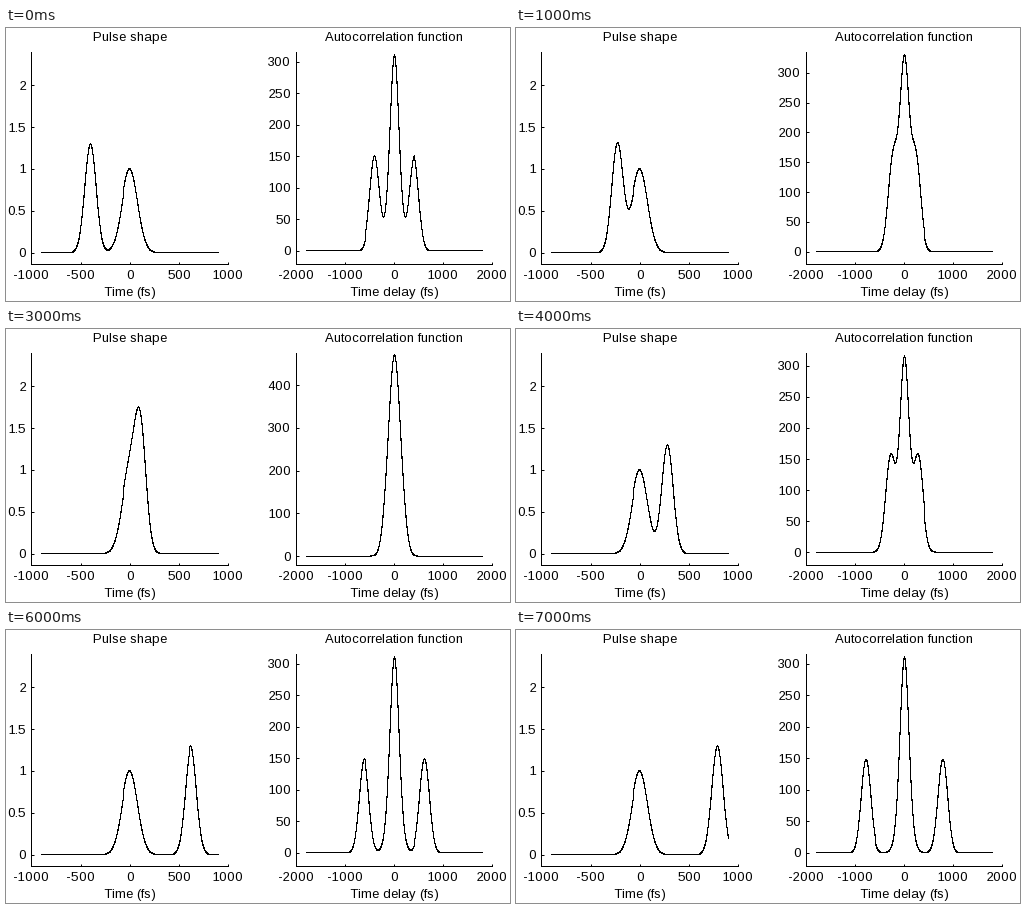
A matplotlib script for the animation above (8000 ms loop, 504 by 273 pixels).

```python
import numpy as np
import matplotlib.pyplot as plt
from matplotlib.animation import FuncAnimation
from matplotlib.transforms import IdentityTransform

W, H, DPI = 504, 273, 84
FRAMES, INTERVAL = 8, 1000
PX = 72 / DPI  # points per pixel

plt.rcParams.update({
    "font.family": "Liberation Sans",
    "font.size": 13 * PX,
    "axes.unicode_minus": False,
    "text.hinting": "force_autohint",
    "text.hinting_factor": 1,
    "path.simplify": False,
})

fig = plt.figure(figsize=(W / DPI, H / DPI), dpi=DPI, facecolor="white")

time = np.arange(-900, 901)
delay = np.arange(-1800, 1801)


def pulse(shift):
    fixed = np.exp(-time**2 / (2 * 80**2))
    moving = 1.3 * np.exp(-((time - shift) / 80) ** 2)
    return fixed + moving


def panel(left, right, title, xlabel, xlim, xticks):
    """Open axes placed by pixel, with a title and an x label."""
    bottom, height = 37.4, 212
    ax = fig.add_axes([left / W, bottom / H, (right - left) / W, height / H])
    ax.set_xlim(-xlim, xlim)
    ax.set_xticks(xticks)
    ax.spines[["top", "right"]].set_visible(False)
    ax.spines[["left", "bottom"]].set_linewidth(PX)
    ax.tick_params(direction="in", length=2.5 * PX, width=PX)
    ax.tick_params(axis="x", pad=6 * PX)
    ax.tick_params(axis="y", pad=5 * PX)
    mid = (left + right) / 2 / W
    fig.text(mid, 1 - 13 / H, title, ha="center", va="baseline")
    fig.text(mid, 1 - 268 / H, xlabel, ha="center", va="baseline")
    # A hairline without smoothing fills exactly the pixels it touches.
    line, = ax.plot([], [], color="black", lw=0.1 * PX, antialiased=False,
                    snap=False, transform=IdentityTransform())
    return ax, line


def trace(ax, line, x, y):
    """Draw the curve through pixel centres, about one point per column."""
    step = len(x) // 180
    pts = ax.transData.transform(np.column_stack([x, y])[::step])
    line.set_data(*(np.floor(pts) + 0.5).T)


shape_ax, shape_line = panel(25.4, 222.4, "Pulse shape", "Time (fs)",
                             1000, range(-1000, 1001, 500))
shape_ax.set_ylim(-0.13, 2.4)
shape_ax.set_yticks([0, 0.5, 1, 1.5, 2], ["0", "0.5", "1", "1.5", "2"])

corr_ax, corr_line = panel(290.4, 486.4, "Autocorrelation function",
                           "Time delay (fs)", 2000, range(-2000, 2001, 1000))


def update(i):
    y = pulse(-400 + 170 * i)
    corr = np.correlate(y, y, "full")
    top = corr.max() + 5
    corr_ax.set_ylim(-20, top)
    corr_ax.set_yticks(np.arange(0, top, 50 if top < 400 else 100))
    trace(shape_ax, shape_line, time, y)
    trace(corr_ax, corr_line, delay, corr)
    return shape_line, corr_line


anim = FuncAnimation(fig, update, frames=FRAMES, interval=INTERVAL,
                     repeat=True, repeat_delay=0, blit=False)
plt.show()
```
